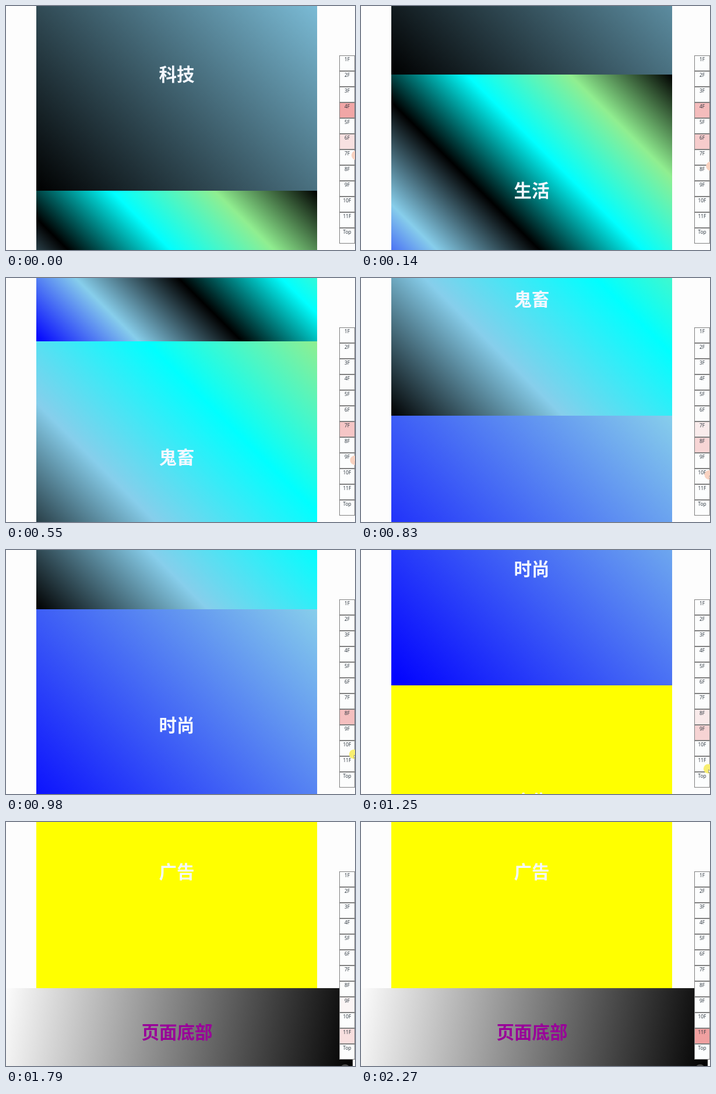
Write an HTML page that moves like this. It is 599x420 px and loops after 2340 ms.

```html
<!DOCTYPE html>
<html lang="zh-CN">
<head>
<meta charset="utf-8">
<style>
html, body { margin: 0; width: 100%; height: 100%; overflow: hidden; background: #fdfdfd; }
#stage { position: relative; width: 599px; height: 420px; overflow: hidden; }
#page { position: absolute; left: 0; top: -82px; width: 599px; }
section, footer {
  position: absolute; text-align: center; white-space: nowrap;
  font: bold 30.5px "Noto Sans CJK SC", "Noto Sans CJK", sans-serif;
}
section { left: 52px; width: 482px; height: 400px; line-height: 397px; color: #f4f8ff; }
footer {
  left: -8px; top: 2000px; width: 603px; height: 150px; line-height: 148px;
  color: #990099; background: linear-gradient(100deg, #fff, #000);
}
#nav { position: absolute; left: 572px; top: 85px; width: 27px; }
#nav div {
  box-sizing: border-box; width: 27px; height: 27px; border: 1px solid #808080;
  text-align: center; font: 8.3px/11px "Open Sans", "Noto Sans", sans-serif; color: #222c36;
}
#pointer { position: absolute; left: -8px; top: -8px; width: 16px; height: 16px; }
#spot { width: 16px; height: 16px; border-radius: 50%; }
#pointer svg { position: absolute; left: 8px; top: 9px; }
</style>
</head>
<body>
<div id="stage">
  <div id="page"></div>
  <div id="nav"></div>
  <div id="pointer">
    <div id="spot"></div>
    <svg width="6" height="8"><path d="M.5 .5V6L2 4.8 3 7 4 6.6 3.1 4.5H5Z" fill="#fff" stroke="#555" stroke-width=".6"/></svg>
  </div>
</div>
<script>
const LOOP = 2340, TICK = 137.5;
const FADE = 0.17; // highlight change per tick

const floors = [
  ["科技", "linear-gradient(45deg, black, skyblue)"],
  ["生活", "linear-gradient(45deg, blue, skyblue, black, aqua, lightgreen, black)"],
  ["鬼畜", "linear-gradient(45deg, black, skyblue, aqua, lightgreen)"],
  ["时尚", "linear-gradient(45deg, blue, skyblue)"],
  ["广告", "yellow"]
];

// [tick, scroll offset]
const scroll = [[0, 0], [2, 399], [4, 609], [6, 881], [9, 1285], [11, 1527], [12, 1632]];

// ticks at which 4F to 11F become the current floor
const enter = [-9, -1.8, -1.3, 1.4, 4.1, 7, 10.2, 11.6];

const $ = id => document.getElementById(id);
const clamp = v => Math.min(1, Math.max(0, v));

function add(parent, tag, text) {
  const el = document.createElement(tag);
  el.textContent = text;
  parent.append(el);
  return el;
}

floors.forEach(([name, fill], i) => {
  const el = add($("page"), "section", name);
  el.style.top = i * 400 + "px";
  el.style.background = fill;
});
add($("page"), "footer", "页面底部");

const items = Array.from({ length: 12 }, (_, i) => add($("nav"), "div", i < 11 ? i + 1 + "F" : "Top"));

function offsetAt(tick) {
  const i = scroll.findIndex(p => p[0] > tick);
  if (i < 0) return scroll[scroll.length - 1][1];
  const [t0, a] = scroll[i - 1], [t1, b] = scroll[i];
  return a + (b - a) * (tick - t0) / (t1 - t0);
}

// rises while the floor is current, then falls at the same rate
function glow(i, tick) {
  const from = enter[i], to = enter[i + 1] ?? Infinity;
  if (!(tick > from)) return 0;
  const peak = clamp((Math.min(tick, to) - from) * FADE);
  return clamp(peak - Math.max(0, tick - to) * FADE);
}

function draw(tick) {
  const y = offsetAt(tick);
  const parked = tick > 12;
  $("page").style.transform = `translateY(${-Math.round(y)}px)`;
  $("pointer").style.transform = parked
    ? "translate(582px, 425px)"
    : `translate(${601 - y * 0.004}px, ${257 + y * 0.093}px)`;
  $("spot").style.background = parked ? "#484848" : y > 950 ? "#f8ee70" : "#f8d2c0";
  items.forEach((el, i) => {
    const c = Math.round(253 - 125 * glow(i - 3, tick));
    el.style.background = `rgb(${Math.round(220 + c / 8)}, ${c}, ${c})`;
  });
}

const start = performance.now();
function frame(now) {
  draw(Math.floor(Math.max(0, now - start) % LOOP / TICK));
  requestAnimationFrame(frame);
}
draw(0);
requestAnimationFrame(frame);
</script>
</body>
</html>
```
